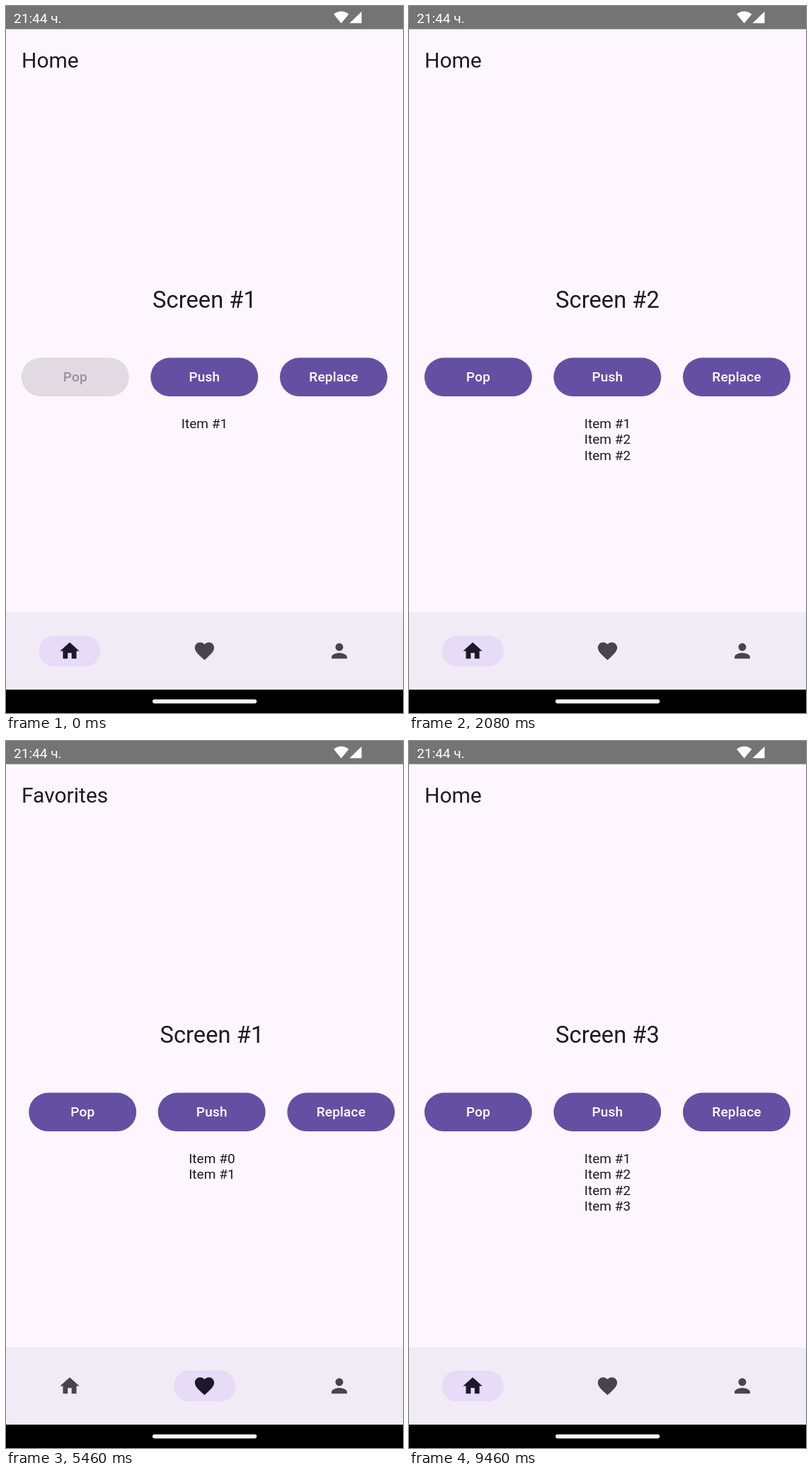
Recreate the animation shown at these times as an HTML page. Size 561 by 998 pixels, loop 9.5 s.

```html
<!DOCTYPE html>
<html lang="en">
<head>
<meta charset="utf-8">
<title>Tab navigation</title>
<style>
  html, body { margin: 0; width: 100%; height: 100%; overflow: hidden; background: #fdf6fe; }
  svg { display: block; width: 561px; height: 998px; font-family: Roboto, "Noto Sans", sans-serif; fill: #1d1b20; }
  text { white-space: pre; }
  .small { font-size: 19.09px; }
  .heading { font-size: 32.73px; text-anchor: middle; }
  .item { font-size: 19.09px; text-anchor: middle; }
  .button rect { fill: #654fa3; }
  .button text { fill: #fff; font-size: 19.09px; font-weight: 500; letter-spacing: .136px; text-anchor: middle; }
  .disabled rect { fill: #e1dae2; }
  .disabled text { fill: #989399; }
</style>
</head>
<body>
<svg id="stage" viewBox="0 0 561 998">
  <defs>
    <radialGradient id="wave">
      <stop offset=".55" stop-color="#000" stop-opacity=".11"/>
      <stop offset="1" stop-color="#000" stop-opacity="0"/>
    </radialGradient>
  </defs>
  <rect width="561" height="998" fill="#fdf6fe"/>
  <g id="screens"></g>
  <text id="title" x="22" y="87" font-size="30"></text>

  <rect width="561" height="32.7" fill="#747474"/>
  <g fill="#fff">
    <text class="small" x="11" y="24">21:44 ч.</text>
    <path d="M463 11.6Q473.5 3.6 484.4 11.6L473.7 24.6Z"/>
    <path d="M502.5 7.8V24.3H485.5Z"/>
  </g>

  <rect y="856" width="561" height="109" fill="#f1ebf6"/>
  <g id="tabs"></g>
  <rect y="965" width="561" height="33" fill="#000"/>
  <rect x="207" y="978.8" width="147.3" height="5.6" rx="2.8" fill="#f4f4f4"/>
</svg>
<script>
const LOOP = 9500, WIDTH = 561;
const PILL = { width: 87.3, height: 43.6, y: 888.7 };

const tabs = [
  { title: 'Home', x: 90, icon: 'M10 20v-6h4v6h5v-8h3L12 3 2 12h3v8z' },
  { title: 'Favorites', x: 280.5, icon: 'M12 21.35l-1.45-1.32C5.4 15.36 2 12.28 2 8.5 2 5.42 4.42 3 7.5 3c1.74 0 3.41.81 4.5 2.09C13.09 3.81 14.76 3 16.5 3 19.58 3 22 5.42 22 8.5c0 3.78-3.4 6.86-8.55 11.54z' },
  { title: 'Profile', x: 471, icon: 'M12 12c2.21 0 4-1.79 4-4s-1.79-4-4-4-4 1.79-4 4 1.79 4 4 4zm0 2c-2.67 0-8 1.34-8 4v2h16v-2c0-2.66-5.33-4-8-4z' }
];
const stacks = [
  [{ n: 1, at: -1e4 }, { n: 2, at: 1150 }, { n: 2, at: 1320 }, { n: 3, at: 2650 }],
  [{ n: 0, at: -1e4 }, { n: 1, at: 5165 }],
  [{ n: 0, at: -1e4 }]
];
const visits = [
  { tab: 0, at: -1e4 }, { tab: 1, at: 3990 }, { tab: 2, at: 6500 },
  { tab: 1, at: 7815 }, { tab: 0, at: 8750 }
];

const clamp = v => Math.max(0, Math.min(1, v));

function add(parent, name, attrs = {}, text = '') {
  const node = document.createElementNS('http://www.w3.org/2000/svg', name);
  for (const key in attrs) node.setAttribute(key, attrs[key]);
  node.textContent = text;
  return parent.appendChild(node);
}

function addButton(parent, x, label) {
  const group = add(parent, 'g', { class: 'button' });
  add(group, 'rect', { x, y: 496.6, width: 152, height: 54.4, rx: 27.2 });
  add(group, 'text', { x: x + 76, y: 530.4 }, label);
  return group;
}

const screenLayer = document.getElementById('screens');
const tabLayer = document.getElementById('tabs');
const title = document.getElementById('title');

stacks.forEach(stack => stack.forEach(screen => {
  const group = screen.group = add(screenLayer, 'g');
  add(group, 'text', { class: 'heading', x: 280.5, y: 425.5 }, `Screen #${screen.n}`);
  screen.pop = addButton(group, 21.8, 'Pop');
  addButton(group, 204.3, 'Push');
  addButton(group, 387, 'Replace');
  screen.items = stack.map(({ n }, i) =>
    add(group, 'text', { class: 'item', x: 280.5, y: 595.8 + i * 22.37 }, `Item #${n}`));
}));

tabs.forEach((tab, i) => {
  const pill = { y: PILL.y, height: PILL.height, rx: PILL.height / 2 };
  const clip = add(tabLayer, 'clipPath', { id: `clip${i}` });
  add(clip, 'rect', { ...pill, x: tab.x - PILL.width / 2, width: PILL.width });
  tab.pill = add(tabLayer, 'rect', { ...pill, fill: '#e6dcf7' });
  const ripple = add(tabLayer, 'g', { 'clip-path': `url(#clip${i})` });
  tab.ripple = add(ripple, 'circle', { cx: tab.x + 4.5, cy: 924, fill: 'url(#wave)' });
  tab.glyph = add(tabLayer, 'path', {
    d: tab.icon, transform: `translate(${tab.x - 16.36} 894.1) scale(1.3636)`
  });
});

// Critically damped spring: share of the distance still to go.
function remaining(ms) {
  if (ms <= 0) return 1;
  const u = ms / 50;
  return (1 + u) * Math.exp(-u);
}

function drawScreens(t, current) {
  stacks.forEach((stack, tab) => {
    const depth = stack.filter(s => s.at <= t).length;
    stack.forEach((screen, i) => {
      const next = stack[i + 1];
      const leaving = next ? 1 - remaining(t - next.at) : 0;
      const x = WIDTH * (remaining(t - screen.at) - leaving);
      const visible = tab === current && i < depth && x > -WIDTH;
      screen.group.setAttribute('display', visible ? 'inline' : 'none');
      screen.group.setAttribute('transform', `translate(${x.toFixed(2)} 0)`);
      screen.pop.classList.toggle('disabled', depth === 1);
      screen.items.forEach((item, k) => item.setAttribute('display', k < depth ? 'inline' : 'none'));
    });
  });
}

function drawTabs(t, visit, previous) {
  const age = t - visit.at;
  const progress = clamp((age - 20) / 100);
  tabs.forEach((tab, i) => {
    const current = i === visit.tab;
    const on = current ? progress : previous && i === previous.tab ? 1 - progress : 0;
    const width = PILL.width * on;
    tab.pill.setAttribute('x', tab.x - width / 2);
    tab.pill.setAttribute('width', width);
    tab.pill.setAttribute('opacity', on);
    tab.glyph.setAttribute('fill', on > .5 ? '#1d192b' : '#47444d');
    tab.ripple.setAttribute('r', 18 + 110 * clamp(age / 240));
    tab.ripple.setAttribute('opacity', current ? 1 - clamp((age - 230) / 180) : 0);
  });
}

function frame() {
  const t = performance.now() % LOOP;
  const index = visits.filter(v => v.at <= t).length - 1;
  const visit = visits[index];
  title.textContent = tabs[visit.tab].title;
  drawScreens(t, visit.tab);
  drawTabs(t, visit, visits[index - 1]);
  requestAnimationFrame(frame);
}
frame();
</script>
</body>
</html>
```
